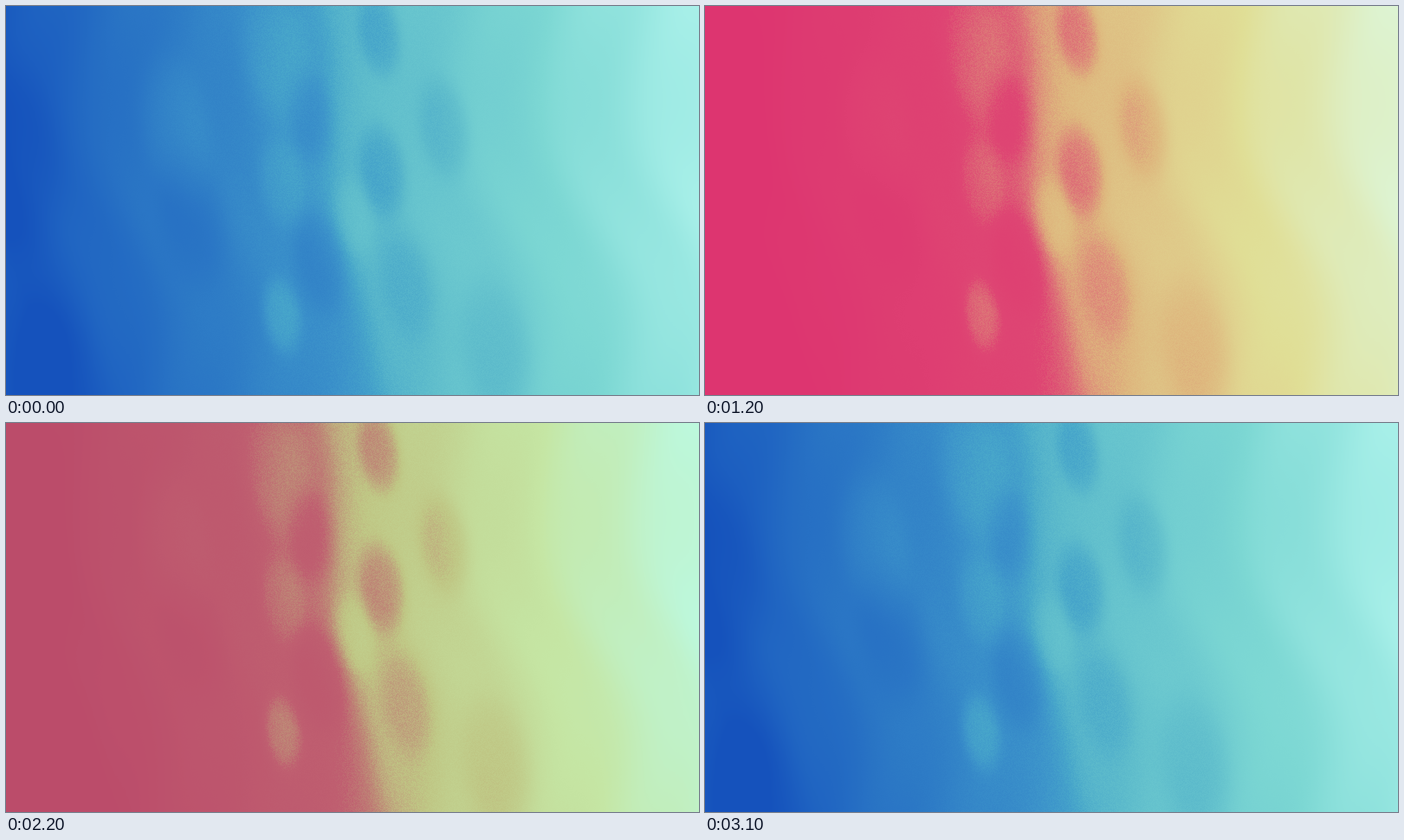
An HTML page with a canvas that plays this animation: 800 by 450 pixels, repeating every 3200 ms.

```html
<!DOCTYPE html>
<html lang="en">
<head>
<meta charset="utf-8">
<title>Shifting colour wash</title>
<style>
  html, body { margin: 0; width: 100%; height: 100%; overflow: hidden; background: #2d7bc8; }
  canvas { display: block; width: 100vw; height: 100vh; }
</style>
</head>
<body>
<canvas id="stage" width="800" height="450"></canvas>
<script>
const W = 800, H = 450, STEP = 100, STEPS = 32, LEVELS = 512;
const ctx = document.getElementById('stage').getContext('2d');

// Soft upright ovals: x, y, half width, strength
const spots = [
  [430, 32, 20, -.13], [434, 190, 22, -.13], [505, 140, 24, -.09], [352, 128, 22, -.07],
  [362, 295, 26, -.08], [462, 325, 26, -.07], [565, 395, 34, -.07], [215, 245, 34, -.05],
  [10, 170, 45, -.06], [60, 440, 45, -.07], [312, 55, 34, .09], [318, 205, 22, .08],
  [318, 358, 18, .13], [400, 245, 20, .06], [195, 140, 34, .06]
];

// Colour ramps by brightness, each reached at its own step
const stops = [0, .1, .4, .52, .64, .82, 1];
const ramps = [
  [0, '1552bc 1e62c1 3c93ca 48a7ca 5dbbcb 7cd7d3 aaf1ea'],
  [4, '625fa0 825c9b 827c9c 82969c 87b6a1 93deb0 a0f6d6'],
  [9, 'bb4c6a bb4c6a bf5f70 be8c77 bfc684 c5e6a4 bcf9e0'],
  [15, 'ff1e76 ff1e76 fd2d76 fb6278 fca576 fcd788 fdf1cc']
].map(([at, text]) => [at, text.split(' ').map(hex =>
  [0, 2, 4].map(i => parseInt(hex.slice(i, i + 2), 16)))]);

const clamp = (v, lo, hi) => Math.min(hi, Math.max(lo, v));
const mix = (a, b, p) => a + (b - a) * p;

// Two brightness slopes joined by a soft, bending edge
function baseLevel(x, y) {
  const u = x - 70 * (y / H) ** 2 - 5 * Math.sin(y / 45);
  const left = Math.max(.03, .053 + .00108 * u);
  const right = .62 + .0009 * (u - 388);
  const edge = 1 / (1 + Math.exp((366 - u) / 9));
  const streaks = .012 * Math.sin(u / 17 + 2 * Math.sin(y / 70));
  return mix(left, right, edge) + streaks;
}

function spotLevel(x, y) {
  let sum = 0;
  for (const [cx, cy, r, strength] of spots) {
    const dy = y - cy, dx = x - cx - .12 * dy;
    const d = (dx * dx + dy * dy / 4) / (r * r);
    if (d < 8) sum += strength * Math.exp(-d * d * .5);
  }
  return sum;
}

function buildField() {
  const field = new Uint16Array(W * H);
  let seed = 7;
  for (let i = 0; i < field.length; i++) {
    const x = i % W, y = Math.floor(i / W);
    const level = baseLevel(x, y) + spotLevel(x, y);
    // Fine grain, strongest in the middle tones
    seed = (seed * 1664525 + 1013904223) >>> 0;
    const grain = (seed / 2 ** 32 - .5) * .06 * Math.exp(-(((level - .5) / .2) ** 2));
    field[i] = Math.round(clamp(level + grain, 0, 1) * (LEVELS - 1));
  }
  return field;
}

// Index of the segment holding v, and the position within it
function locate(keys, v) {
  let i = 0;
  while (i < keys.length - 2 && v > keys[i + 1]) i++;
  return [i, (v - keys[i]) / (keys[i + 1] - keys[i])];
}

const mixColors = (a, b, p) => a.map((v, c) => mix(v, b[c], p));

function buildPalette(step) {
  const [r, p] = locate(ramps.map(ramp => ramp[0]), step);
  const colors = stops.map((_, s) => mixColors(ramps[r][1][s], ramps[r + 1][1][s], p));
  return Uint32Array.from({ length: LEVELS }, (_, n) => {
    const [i, q] = locate(stops, n / (LEVELS - 1));
    const [red, green, blue] = mixColors(colors[i], colors[i + 1], q).map(Math.round);
    return (255 << 24 | blue << 16 | green << 8 | red) >>> 0;
  });
}

const field = buildField();
const picture = ctx.createImageData(W, H);
const pixels = new Uint32Array(picture.data.buffer);
let shown = -1;

function draw(time) {
  const tick = Math.floor(Math.max(0, time) / STEP) % STEPS;
  const step = Math.min(tick, STEPS - 1 - tick);
  if (step === shown) return;
  shown = step;
  const palette = buildPalette(step);
  for (let i = 0; i < pixels.length; i++) pixels[i] = palette[field[i]];
  ctx.putImageData(picture, 0, 0);
}

const start = performance.now();
function loop(now) {
  draw(now - start);
  requestAnimationFrame(loop);
}
draw(0);
requestAnimationFrame(loop);
</script>
</body>
</html>
```
